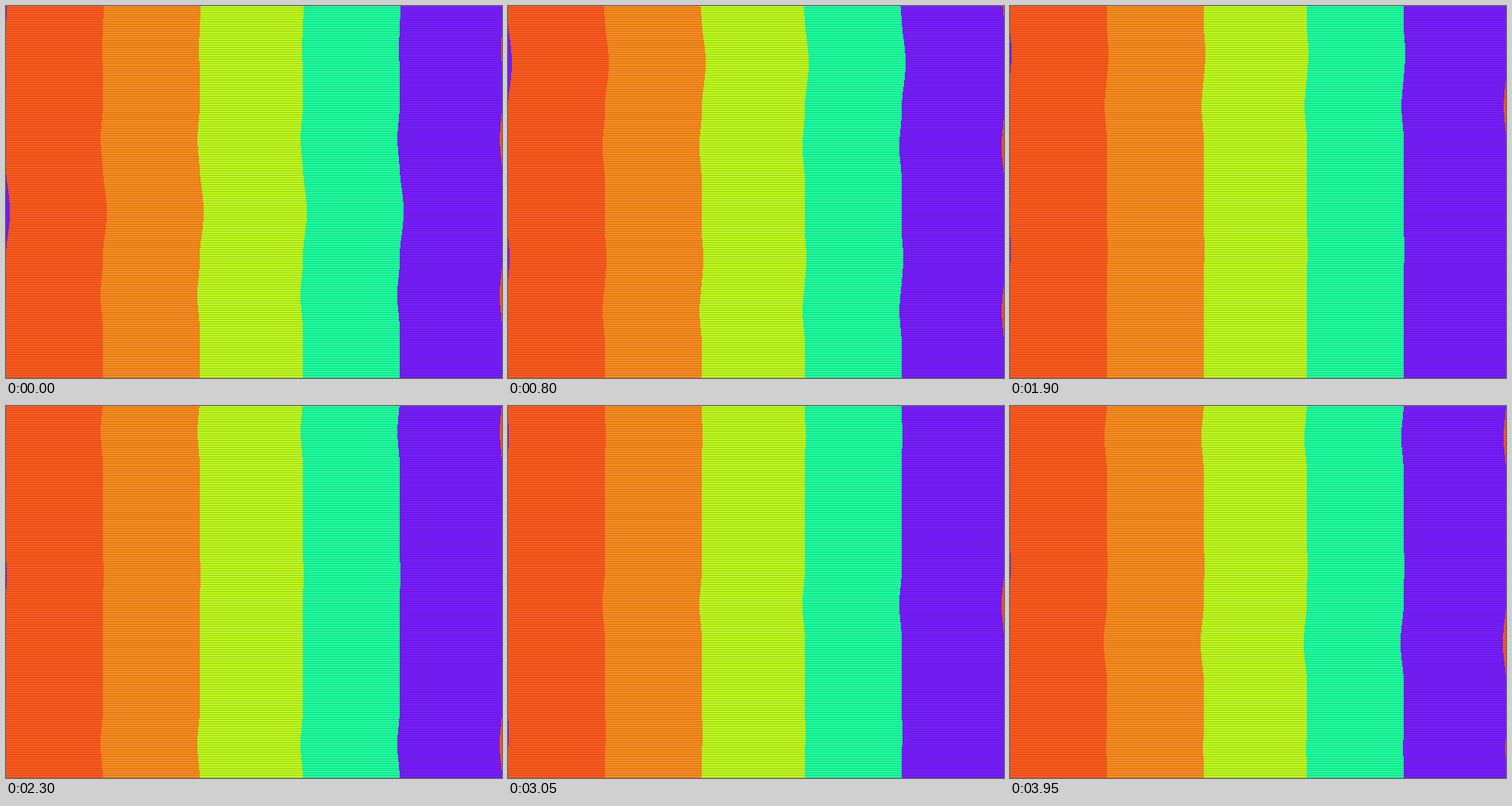
Animation, 640 px wide and 480 px high, one loop 4 s. Source, as an HTML page with a canvas:

```html
<!DOCTYPE html>
<html lang="en">
<head>
<meta charset="utf-8">
<title>Wavy colour bands</title>
<style>
html, body { margin: 0; width: 100%; height: 100%; overflow: hidden; }
canvas { display: block; width: 640px; height: 480px; }
</style>
</head>
<body>
<canvas id="stage" width="640" height="480"></canvas>
<script>
const W = 640, H = 480, LOOP = 4000, STEP = 50, RISE = 12;
const ctx = document.getElementById('stage').getContext('2d');

const bands = [
  { x: 0, color: '#ff5a1e' },
  { x: 125, color: '#fa8c1e' },
  { x: 250, color: '#befa1e' },
  { x: 383, color: '#1effa0' },
  { x: 508, color: '#781eff' }
];

// Ripples along the strip: [centre, sideways push]
const ripples = [
  [0, 1], [55, -1], [171, -2.8], [265, 5], [373, -3], [517, 2],
  [585, -2.8], [770, 1], [988, -3], [1154, 1], [1253, -4], [1389, -0.7]
];

// A raised cosine; stronger pushes spread wider
function bump(dist, push) {
  const reach = 25 + 7 * Math.abs(push);
  if (Math.abs(dist) >= reach) return 0;
  return push * (1 + Math.cos(Math.PI * dist / reach)) / 2;
}

function shiftAt(pos) {
  return Math.round(ripples.reduce((sum, [at, push]) => sum + bump(pos - at, push), 0));
}

function drawRow(y, shift) {
  // Wrap: the last band shows on the left, the first on the right
  ctx.fillStyle = shift > 0 ? bands[4].color : bands[0].color;
  ctx.fillRect(0, y, W, 1);
  bands.forEach(({ x, color }, i) => {
    const end = i < 4 ? bands[i + 1].x : W;
    ctx.fillStyle = color;
    ctx.fillRect(x + shift, y, end - x, 1);
  });
}

function draw(time) {
  const scroll = Math.floor(time % LOOP / STEP) * RISE;
  for (let y = 0; y < H; y++) drawRow(y, shiftAt(y + scroll));
  ctx.fillStyle = 'rgba(0, 0, 0, 0.16)';
  for (let y = 2; y < H; y += 3) ctx.fillRect(0, y, W, 1);
}

const start = performance.now();
function tick() {
  draw(performance.now() - start);
  requestAnimationFrame(tick);
}
tick();
</script>
</body>
</html>
```
